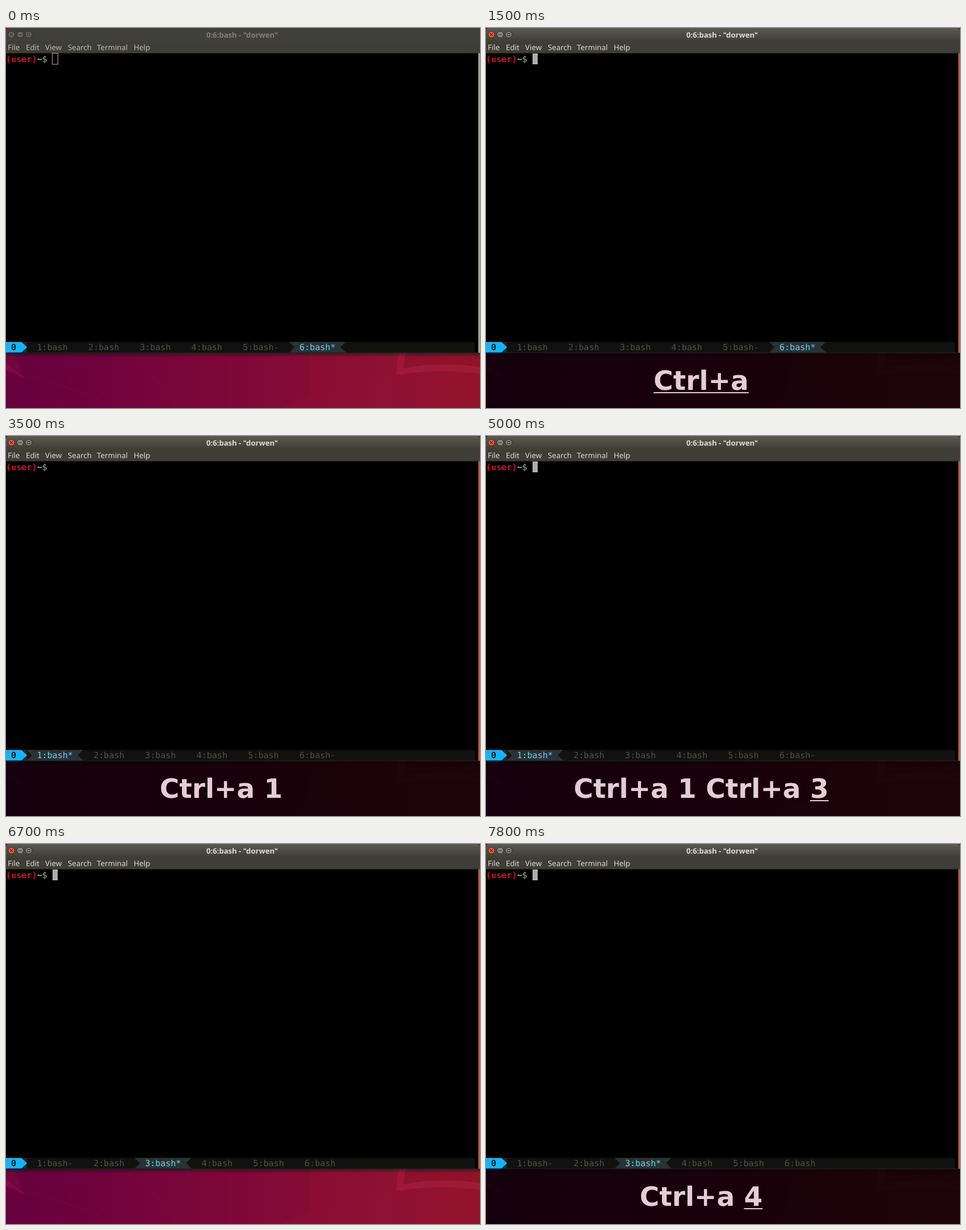
Animation of 835 by 670 pixels, one loop 8 s. Source, as an HTML page:

```html
<!DOCTYPE html>
<html lang="en">
<head>
<meta charset="utf-8">
<title>Terminal window switching</title>
<style>
  html, body { margin: 0; width: 100%; height: 100%; overflow: hidden; background: #000; }
  svg { display: block; width: 835px; height: 670px; }
  text { white-space: pre; text-rendering: geometricPrecision; }
  .mono { font: 15.07px "DejaVu Sans Mono", monospace; }
  .bold { font-weight: bold; }
  .ui { font: 13.3px "Noto Sans", "Open Sans", sans-serif; }
  .title { font: bold 13.1px "Noto Sans", "Open Sans", sans-serif; text-anchor: middle; }
  .keys { font: bold 47px "DejaVu Sans", sans-serif; text-anchor: middle; fill: #fff; }
</style>
</head>
<body>
<svg viewBox="0 0 835 670">
  <defs>
    <linearGradient id="wall">
      <stop offset="0" stop-color="#66003f"/>
      <stop offset=".45" stop-color="#7d0739"/>
      <stop offset=".8" stop-color="#8b1030"/>
      <stop offset="1" stop-color="#901329"/>
    </linearGradient>
    <linearGradient id="bar" x2="0" y2="1">
      <stop offset="0" stop-color="#5a5a50"/>
      <stop offset="1" stop-color="#3e3e37"/>
    </linearGradient>
    <linearGradient id="shade" x2="0" y2="1">
      <stop offset="0" stop-color="#000" stop-opacity=".35"/>
      <stop offset="1" stop-color="#000" stop-opacity="0"/>
    </linearGradient>
  </defs>

  <g id="desktop">
    <rect width="835" height="670" fill="url(#wall)"/>
    <g fill="#b01c50" fill-opacity=".25">
      <path d="M0 573H14L34 619L0 604Z" fill-opacity=".14"/>
      <path d="M0 592L28 612L34 619L0 604Z" fill-opacity=".18"/>
      <path d="M691 573H704L700 600Q768 587 835 598V610Q765 600 687 612Z" fill="#c02848" fill-opacity=".36"/>
      <path d="M515 656Q600 620 687 612Q765 600 835 610V670H480Z" fill-opacity=".09"/>
      <path d="M538 573H691L687 612Q600 622 534 648Z" fill-opacity=".07"/>
    </g>
    <g fill="none" stroke="#a51a4b" stroke-opacity=".2">
      <path d="M538 573L533 670M34 612Q100 628 170 658M230 573L300 670"/>
    </g>
    <rect y="573" width="835" height="8" fill="url(#shade)"/>
  </g>

  <path d="M0 573V6Q0 0 6 0H829Q835 0 835 6V573Z" fill="#3e3e37"/>
  <g id="focused"></g>
  <g id="blurred"></g>

  <rect y="44.5" width="832" height="528" fill="#000"/>
  <text class="mono bold" x="0" y="60" fill="#c4161e">(user)</text>
  <text class="mono bold" x="54.4" y="60" fill="#34e2d8">~</text>
  <text class="mono" x="63.5" y="60" fill="#aaa">$</text>
  <rect id="solid" x="82" y="45" width="9" height="19" fill="#b0aeaa"/>
  <rect id="hollow" x="81.5" y="44.5" width="10" height="19.5" fill="none" stroke="#b0aeaa"/>

  <rect y="553.5" width="826" height="18.5" fill="#11120f"/>
  <g id="tabs"></g>
  <path d="M27 553.5H36.5V572H27Z" fill="#24282a"/>
  <path d="M0 553.5H27L37 562.8L27 572H0Z" fill="#14b4fa"/>
  <text class="mono bold" x="9.07" y="568" fill="#0c1a20">0</text>

  <g id="overlay" opacity=".8">
    <rect y="573.5" width="835" height="96.5"/>
    <text id="keys" class="keys" x="379" y="638"></text>
    <rect id="line" y="642" height="2" fill="#fff"/>
  </g>
</svg>

<script>
const $ = id => document.getElementById(id);
const LOOP = 8000, CELL = 9.07;

// time, focus, cursor on, active window, previous window, keys shown, underlined tail
const steps = [
  [0,    0,  0, 6, 5, "", 0],
  [400,  .6, 1, 6, 5, "", 0],
  [500,  1,  1, 6, 5, "", 0],
  [900,  1,  0, 6, 5, "", 0],
  [1500, 1,  1, 6, 5, "Ctrl+a", 6],
  [1700, 1,  1, 6, 5, "Ctrl+a", 0],
  [2400, 1,  0, 6, 5, "Ctrl+a", 0],
  [2500, 1,  1, 6, 5, "Ctrl+a 1", 1],
  [2700, 1,  1, 1, 6, "Ctrl+a 1", 0],
  [3500, 1,  0, 1, 6, "Ctrl+a 1", 0],
  [3700, 1,  1, 1, 6, "Ctrl+a 1", 0],
  [4000, 1,  1, 1, 6, "Ctrl+a 1 Ctrl+a", 6],
  [4100, 1,  1, 1, 6, "Ctrl+a 1 Ctrl+a", 0],
  [4700, 1,  0, 1, 6, "Ctrl+a 1 Ctrl+a", 0],
  [5000, 1,  1, 1, 6, "Ctrl+a 1 Ctrl+a 3", 1],
  [5200, 1,  1, 3, 1, "Ctrl+a 1 Ctrl+a 3", 0],
  [5600, 1,  0, 3, 1, "Ctrl+a 1 Ctrl+a 3", 0],
  [6200, 1,  1, 3, 1, "Ctrl+a 1 Ctrl+a 3", 0],
  [6700, 1,  1, 3, 1, "", 0],
  [6800, 1,  0, 3, 1, "", 0],
  [7000, 1,  1, 3, 1, "Ctrl+a", 6],
  [7100, 1,  1, 3, 1, "Ctrl+a", 0],
  [7800, 1,  1, 3, 1, "Ctrl+a 4", 1]
];

const menu = [["File", 4], ["Edit", 36], ["View", 70], ["Search", 110], ["Terminal", 161], ["Help", 226]];

function frame(on) {
  const button = (x, fill, mark) =>
    `<circle cx="${x}" cy="11.5" r="5.8" fill="${fill}" stroke="#2d2c28"/>
     <path transform="translate(${x} 11.5)" d="${mark}" fill="none" stroke="#35342f" stroke-width="1.1"/>`;
  const grey = on ? "#85837a" : "#66655d";
  const labels = menu.map(([word, x]) =>
    `<text class="ui" x="${x - 1}" y="39" fill="${on ? "#dcd8cf" : "#bbb7ae"}">${word}</text>`).join("");
  return `<path d="M0 44.5V6Q0 0 6 0H829Q835 0 835 6V44.5Z" fill="#3e3e37"/>
    <path d="M0 23V6Q0 0 6 0H829Q835 0 835 6V23Z" fill="${on ? "url(#bar)" : "#40403a"}"/>
    ${button(9.5, on ? "#e4593a" : grey, "M-2.3-2.3L2.3 2.3M2.3-2.3L-2.3 2.3")}
    ${button(25, grey, "M-3 0H3")}
    ${button(40, grey, "M-2.3-2.3H2.3V2.3H-2.3Z")}
    <text class="title" x="416" y="16.5" fill="${on ? "#dfdbd2" : "#827f79"}">0:6:bash - "dorwen"</text>
    ${labels}
    <rect x="832" y="44.5" width="3" height="528" fill="${on ? "#c9562f" : "#a5a29c"}"/>`;
}

function tabs(active, last) {
  let col = 4, out = "";
  for (let n = 1; n <= 6; n++) {
    const name = n + ":bash" + (n === active ? "*" : n === last ? "-" : "");
    const left = col * CELL, right = (col + name.length + 4) * CELL;
    if (n === active)
      out += `<path d="M${left} 553.5H${right}L${right - 9.5} 562.8L${right} 572H${left}L${left + 9.5} 562.8Z" fill="#2b3235"/>`;
    out += `<text class="mono" x="${left + 2 * CELL}" y="568" fill="${n === active ? "#66d4f0" : "#504f4d"}">${name}</text>`;
    col += name.length + 4;
  }
  return out;
}

function show([, focus, cursor, active, last, keys, tail]) {
  $("blurred").setAttribute("opacity", 1 - focus);
  $("solid").style.display = cursor ? "" : "none";
  $("hollow").style.display = focus ? "none" : "";
  $("tabs").innerHTML = tabs(active, last);
  $("overlay").style.display = keys ? "" : "none";
  $("keys").textContent = keys;
  let width = 0;
  if (tail) {
    const text = $("keys");
    width = text.getSubStringLength(keys.length - tail, tail);
    $("line").setAttribute("x", 379 + text.getComputedTextLength() / 2 - width);
  }
  $("line").setAttribute("width", width);
}

$("focused").innerHTML = frame(true);
$("blurred").innerHTML = frame(false);

const start = performance.now();
let current;
function tick() {
  const t = (performance.now() - start) % LOOP;
  const step = steps.findLast(s => s[0] <= t);
  if (step !== current) show(current = step);
  requestAnimationFrame(tick);
}
tick();
</script>
</body>
</html>
```
